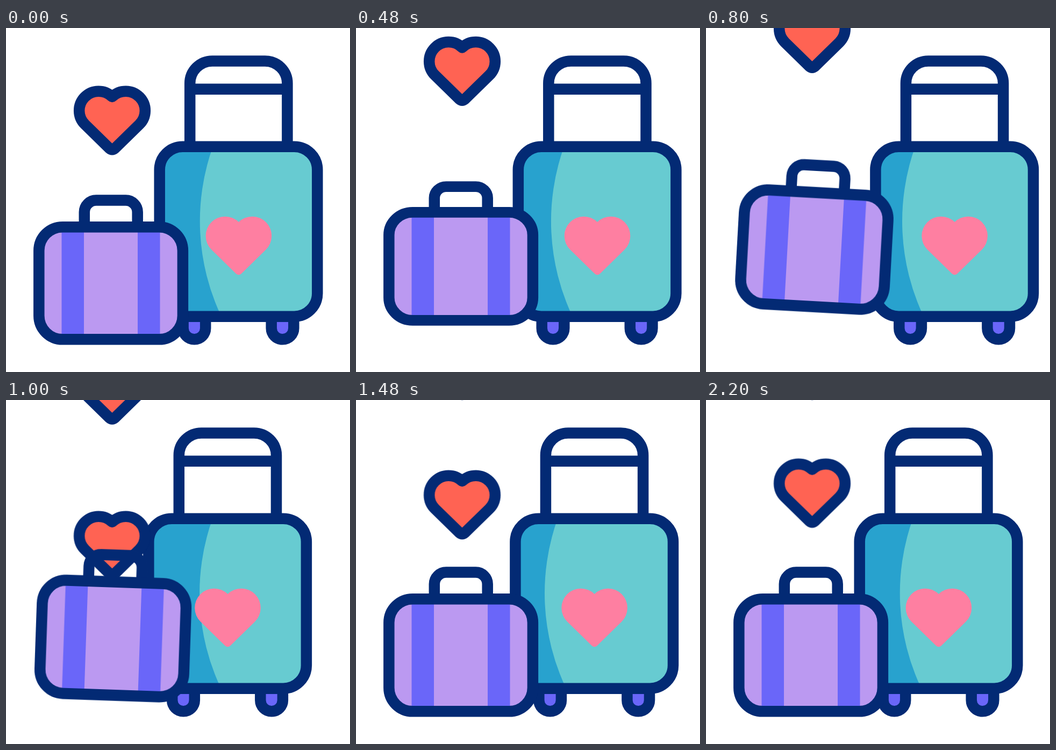
Recreate the animation shown at these times as an HTML page. Size 640x640 px, loop 2240 ms.

```html
<!DOCTYPE html>
<html lang="en">
<head>
<meta charset="utf-8">
<title>Luggage</title>
<style>
  html, body { margin: 0; width: 100%; height: 100%; overflow: hidden; background: #fff; }
  svg { display: block; width: 100vw; height: 100vh; }

  .line { stroke: #032a74; stroke-width: 20.5; stroke-linejoin: round; fill: none; }
  .teal { fill: #67cbd1; }
  .blue { fill: #28a2ce; }
  .violet { fill: #6a66f9; }
  .lilac { fill: #bb99f1; }
  .pink { fill: #fe7fa1; }
  .red { fill: #ff6353; }

  .case, .shade, .bag, .leaving, .arriving {
    animation-duration: 2240ms;
    animation-iteration-count: infinite;
    animation-timing-function: cubic-bezier(.3333, 0, .6667, 1);
  }
  .case { animation-name: roll; }
  .shade { animation-name: shade; }
  .bag { animation-name: hop, sway, squash; transform-origin: 195px 589.5px; }
  .leaving { animation-name: leave; animation-timing-function: linear; }
  .arriving { animation-name: arrive; animation-timing-function: linear; }

  @keyframes roll {
    0%, 12.5% { translate: 0 0; }
    32.143% { translate: 37px 0; }
    51.786% { translate: -44.7px 0; }
    69.643% { translate: 17px 0; }
    87.5%, 100% { translate: 0 0; }
  }
  /* the shade drifts only slightly, so it runs against the case */
  @keyframes shade {
    0%, 12.5% { translate: 0 0; }
    32.143% { translate: -32px 0; }
    51.786% { translate: 41.7px 0; }
    69.643% { translate: -27.5px 0; }
    87.5%, 100% { translate: 0 0; }
  }
  @keyframes hop {
    0%, 12.5% { translate: 0 0; }
    28.571%, 37.5% { translate: 0 -61px; }
    51.786%, 100% { translate: 0 0; }
  }
  @keyframes sway {
    0%, 21.429% { rotate: 0deg; }
    28.571% { rotate: -4.3deg; }
    37.5% { rotate: 4deg; }
    51.786%, 100% { rotate: 0deg; }
  }
  @keyframes squash {
    0% { scale: 1 1; }
    12.5% { scale: 1 .885; }
    28.571%, 37.5% { scale: 1 1.015; }
    51.786%, 100% { scale: 1 1; }
  }
  @keyframes leave {
    0% { translate: 0 0; }
    55.357%, 100% { translate: 0 -236.6px; }
  }
  @keyframes arrive {
    0%, 37.49% { translate: 0 245px; opacity: 0; }
    37.5% { translate: 0 245px; opacity: 1; animation-timing-function: ease-out; }
    51.786% { translate: 0 32.4px; opacity: 1; }
    100% { translate: 0 0; opacity: 1; }
  }
</style>
</head>
<body>
<svg viewBox="0 0 640 640">
  <defs>
    <path id="heart" d="M-50.5 25.5A36 36 0 0 1 0 -26A36 36 0 0 1 50.5 25.5L4.8 70.2Q0 74.5 -4.8 70.2Z"/>
    <path id="wheel" d="M-20.8 537V558.5A20.8 20.8 0 0 0 20.8 558.5V537"/>
    <rect id="shell" x="285.7" y="220.7" width="293.6" height="316" rx="43"/>
    <clipPath id="inside"><use href="#shell"/></clipPath>
  </defs>

  <g class="case">
    <use href="#wheel" x="350.4" class="line violet"/>
    <use href="#wheel" x="514.5" class="line violet"/>
    <path class="line" d="M342.2 220V103A41.6 41.6 0 0 1 383.8 61.4H481.8A41.6 41.6 0 0 1 523.4 103V220M342.2 113.7H523.4"/>
    <use href="#shell" class="teal"/>
    <g clip-path="url(#inside)">
      <path class="shade blue" d="M150 221H384.7A413 413 0 0 0 400.8 537H150Z"/>
    </g>
    <use href="#shell" class="line"/>
    <use href="#heart" x="432.9" y="387" class="pink"/>
  </g>

  <use href="#heart" x="197.5" y="154.2" class="leaving line red" style="fill:#ff6353"/>
  <use href="#heart" x="197.5" y="154.2" class="arriving line red" style="fill:#ff6353"/>

  <g class="bag">
    <path class="line" d="M145.8 370V342.5A22 22 0 0 1 167.8 320.5H222.7A22 22 0 0 1 244.7 342.5V370"/>
    <rect class="lilac" x="61.3" y="370.2" width="267.6" height="209.1" rx="44"/>
    <path class="violet" d="M103.5 372H145V578H103.5ZM245 372H286.5V578H245Z"/>
    <rect class="line" x="61.3" y="370.2" width="267.6" height="209.1" rx="44"/>
  </g>
</svg>
</body>
</html>
```
